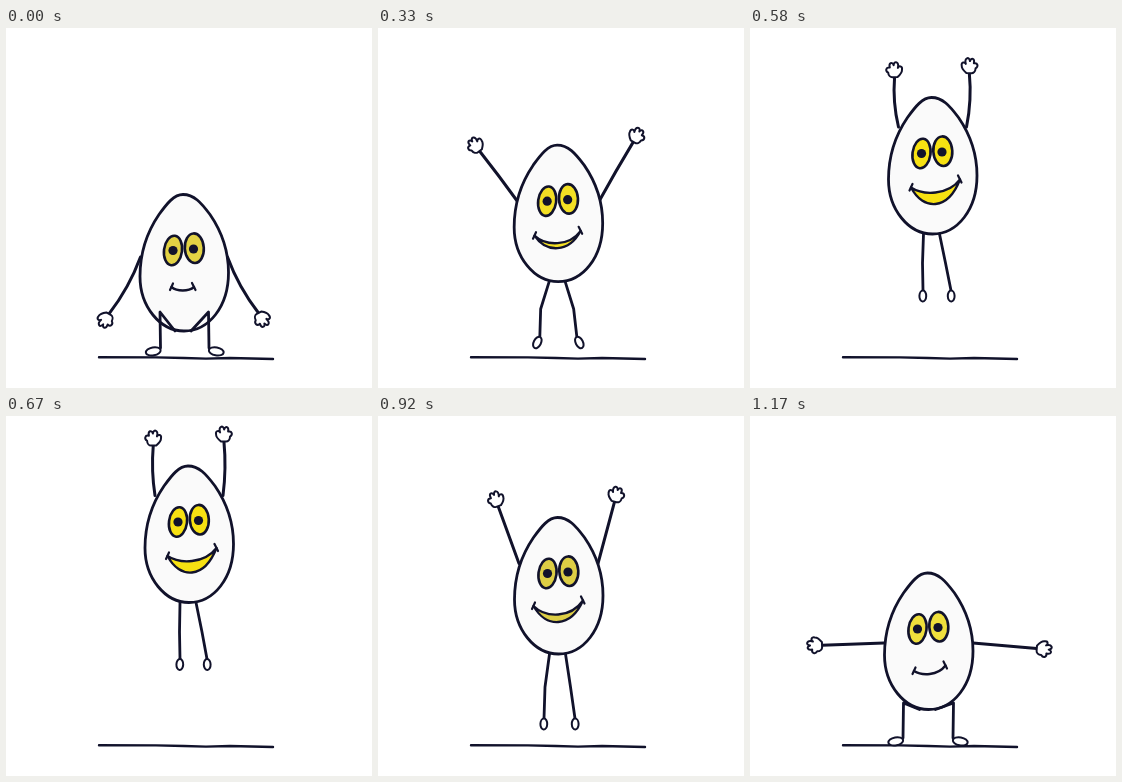
These frames come from a looping animation (366x360 px, 1260 ms). An HTML page with a canvas:

```html
<!DOCTYPE html>
<html lang="en">
<head>
<meta charset="utf-8">
<title>Jumping egg</title>
<style>
html, body { margin: 0; width: 100%; height: 100%; overflow: hidden; background: #fff; }
canvas { display: block; }
</style>
</head>
<body>
<canvas id="stage" width="366" height="360"></canvas>
<script type="module">
const ctx = document.getElementById('stage').getContext('2d');
const INK = '#11122b', SHELL = '#fafafa';
const LOOP = 1260, STEPS = 15;

const eggPath = new Path2D('M-1 0C-10 0-17 9-25 20C-38 39-44 58-44 82C-44 112-24 136.5 0 136.5C25 136.5 44.5 112 44.5 78C44.5 55 37 36 26 20C17 8 10 0-1 0Z');
const handPath = new Path2D('M0-3C3-7 5-8 7-8C11-9 11-5 9-4C15-6 17-1 12 0C16 1 15 5 10 4C11 8 7 9 5 6C2 6 0 4 0 2Z');
const groundPath = new Path2D('M93 329.2L150 329.4L178 330L200 330.6L224 330L267 331');

// egg: centre x, top | arms: shoulder dx, dy, left/right angle, left/right length, outward bend
// knees, ankles: left x, right x, y | mouth: corners, upper and lower lip depth | toe: 0 flat, 1 hanging
const squat = {
  egg: [178, 166.5], arms: [43.5, 62.5, 119, 61, 65, 64, 5],
  knees: [154, 202.5, 284], ankles: [154.5, 203, 320],
  mouth: [-12.5, 92.5, 10, 92.5, 96, 96], toe: [0], yolk: '#e2d244'
};
const rise = {
  egg: [178.5, 157], arms: [44.5, 70, 178, 5, 62, 64, 0],
  knees: [153.5, 203.5, 287], ankles: [153, 203, 322],
  mouth: [-14.5, 98, 17, 92.5, 101, 101], toe: [0], yolk: '#efdf3c'
};
const spread = {
  egg: [179.5, 148.5], arms: [45, 74, 199, -30, 64, 75, -2],
  knees: [154, 202, 301], ankles: [153.5, 202.5, 321],
  mouth: [-21, 94.5, 18.5, 91, 100, 100], toe: [0], yolk: '#f3df24'
};
const leap = {
  egg: [180.5, 101.5], arms: [39.5, 46, 250, -75, 61, 64, 0],
  knees: [167, 192.5, 271], ankles: [166, 197, 302.5],
  mouth: [-25, 88.5, 24.5, 83, 97, 104.5], toe: [1], yolk: '#ddce45'
};
const fly = {
  egg: [181, 82.5], arms: [37, 38, 259.5, -84.5, 60, 65, 1],
  knees: [170, 192.5, 252], ankles: [169, 197.5, 283.5],
  mouth: [-26, 89.5, 22, 86, 99, 110.5], toe: [1], yolk: '#f0d922'
};
const high = {
  egg: [182.5, 69.5], arms: [34, 29.5, 265.5, -87, 50, 54, 4],
  knees: [172.5, 195.5, 235], ankles: [173, 201, 262.5],
  mouth: [-21.5, 90, 27.5, 82, 95, 106.5], toe: [1], yolk: '#f7e112'
};
const peak = {
  ...high, egg: [183, 50], arms: [34, 29.5, 268, -89, 50, 54, 3],
  knees: [173.5, 196, 216], ankles: [174, 201, 243]
};

function mix(a, b, t) {
  const pose = { yolk: a.yolk };
  for (const key in a) {
    if (key !== 'yolk') pose[key] = a[key].map((v, i) => v + (b[key][i] - v) * t);
  }
  return pose;
}

const poses = [
  squat, rise, spread, mix(spread, leap, 1 / 3), mix(spread, leap, 2 / 3), leap, fly, high,
  peak, high, fly, leap, mix(spread, leap, 0.5), spread, rise
];

function at(x, y, angle, draw) {
  ctx.save();
  ctx.translate(x, y);
  ctx.rotate(angle);
  draw();
  ctx.restore();
}

function shape(path, fill, width) {
  ctx.fillStyle = fill;
  ctx.fill(path);
  ctx.lineWidth = width;
  ctx.stroke(path);
}

function oval(x, y, rx, ry, angle, fill, width) {
  const path = new Path2D();
  path.ellipse(x, y, rx, ry, angle, 0, Math.PI * 2);
  shape(path, fill, width);
}

function line(...points) {
  ctx.beginPath();
  points.forEach(([x, y]) => ctx.lineTo(x, y));
  ctx.stroke();
}

function drawArm(pose, side) {
  const [dx, dy, leftAngle, rightAngle, leftLength, rightLength, bend] = pose.arms;
  const angle = (side < 0 ? leftAngle : rightAngle) * Math.PI / 180;
  const length = side < 0 ? leftLength : rightLength;
  at(pose.egg[0] + side * dx, pose.egg[1] + dy, angle, () => {
    ctx.lineWidth = 3;
    ctx.beginPath();
    ctx.moveTo(0, 0);
    ctx.quadraticCurveTo(length / 2, side * bend, length, 0);
    ctx.stroke();
    ctx.translate(length, 0);
    ctx.scale(1, side);
    shape(handPath, '#fff', 2);
  });
}

function drawLeg(pose, side) {
  const i = side < 0 ? 0 : 1, toe = pose.toe[0];
  const x = pose.ankles[i], y = pose.ankles[2];
  ctx.lineWidth = 2.8;
  line([pose.egg[0] + side * 8 - 1, pose.egg[1] + 136.5], [pose.knees[i], pose.knees[2]], [x, y]);
  const turn = (25 + 63 * toe) * Math.PI / 180;
  const reach = 8 - 2.5 * toe;
  const angle = side < 0 ? Math.PI - turn : turn;
  oval(x + Math.cos(angle) * reach, y + Math.sin(angle) * reach,
    7.5 - 2 * toe, 4 - 0.6 * toe, angle + side * -0.25 * (1 - toe), '#fff', 2);
}

function drawMouth([x1, y1, x2, y2, upper, lower], yolk) {
  const inset = (x2 - x1) / 4;
  const control = depth => (depth - (y1 + y2) / 8) / 0.75;
  const mouth = new Path2D();
  mouth.moveTo(x1, y1);
  mouth.bezierCurveTo(x1 + inset, control(upper), x2 - inset, control(upper), x2, y2);
  if (lower - upper > 1) {
    mouth.bezierCurveTo(x2 - inset, control(lower), x1 + inset, control(lower), x1, y1);
    shape(mouth, yolk, 2.3);
  } else {
    ctx.lineWidth = 2.4;
    ctx.stroke(mouth);
  }
  ctx.lineWidth = 2.2;
  line([x1 + 1.5, y1 - 3.5], [x1 - 1.5, y1 + 3]);
  line([x2 - 2, y2 - 4], [x2 + 1.5, y2 + 3]);
}

function drawFace(pose) {
  oval(-11, 56, 9, 14.8, 0.13, pose.yolk, 2.6);
  oval(10.3, 53.7, 9.5, 14.8, -0.06, pose.yolk, 2.6);
  ctx.fillStyle = INK;
  for (const [x, y] of [[-11, 56], [9.5, 54.5]]) {
    ctx.beginPath();
    ctx.arc(x, y, 4.6, 0, Math.PI * 2);
    ctx.fill();
  }
  drawMouth(pose.mouth, pose.yolk);
}

function draw(pose) {
  ctx.fillStyle = '#fff';
  ctx.fillRect(0, 0, 366, 360);
  ctx.strokeStyle = INK;
  ctx.lineCap = ctx.lineJoin = 'round';
  ctx.lineWidth = 2.4;
  ctx.stroke(groundPath);
  drawArm(pose, -1);
  drawArm(pose, 1);
  at(...pose.egg, 0, () => {
    shape(eggPath, SHELL, 2.8);
    drawFace(pose);
  });
  drawLeg(pose, -1);
  drawLeg(pose, 1);
}

// Poses change at 12 per second, rounded to 10 ms; the last one holds until the loop ends.
function stepAt(time) {
  let step = STEPS - 1;
  while (Math.round(step * 25 / 3) * 10 > time) step--;
  return step;
}

const start = performance.now();
function tick(now) {
  draw(poses[stepAt(Math.max(0, now - start) % LOOP)]);
  requestAnimationFrame(tick);
}
tick(start);
</script>
</body>
</html>
```
